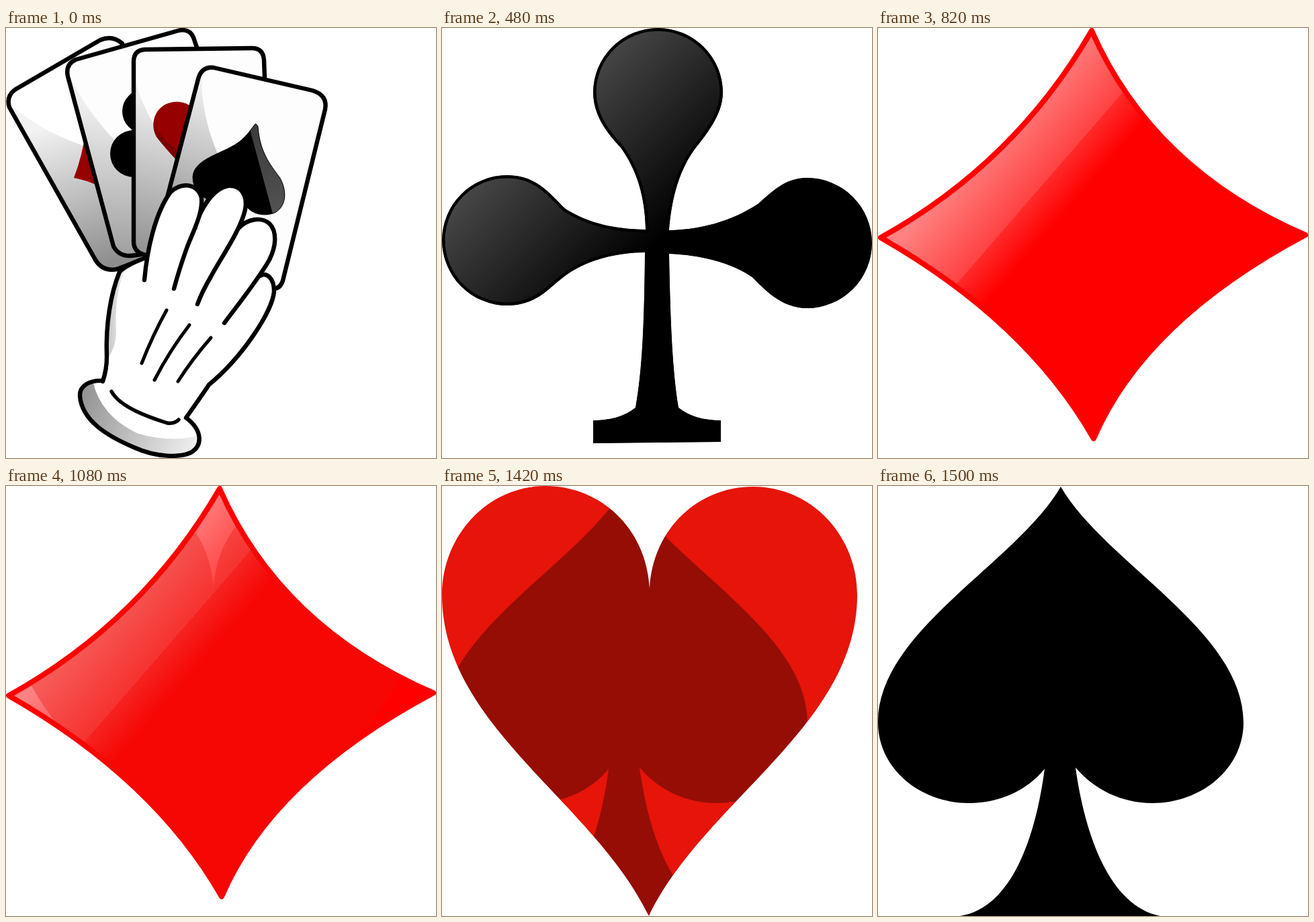
Write an HTML page with a canvas that moves like this. It is 640 by 640 pixels and loops after 1900 ms.

```html
<!DOCTYPE html>
<html>
<head>
<meta charset="utf-8">
<style>
html, body { margin: 0; width: 100%; height: 100%; overflow: hidden; background: #fff; }
canvas { display: block; }
</style>
</head>
<body>
<canvas id="stage" width="640" height="640"></canvas>
<script>
const RED = '#970000', INK = 6.4;
const view = document.getElementById('stage').getContext('2d');

function picture(draw) {
  const canvas = document.createElement('canvas');
  canvas.width = canvas.height = 640;
  const c = canvas.getContext('2d');
  c.lineJoin = c.lineCap = 'round';
  draw(c);
  return canvas;
}

function gradient(c, x0, y0, x1, y1, ...stops) {
  const g = c.createLinearGradient(x0, y0, x1, y1);
  stops.forEach(([at, color]) => g.addColorStop(at, color));
  return g;
}

function shape(c, d, fill, line = 0, color = '#000') {
  const path = new Path2D(d);
  if (fill) { c.fillStyle = fill; c.fill(path); }
  if (line) { c.lineWidth = line; c.strokeStyle = color; c.stroke(path); }
}

// Fill an outline, paint its contents inside it, then stroke it
function framed(c, d, fill, line, paint, color) {
  c.save();
  c.clip(new Path2D(d));
  shape(c, d, fill);
  paint();
  c.restore();
  shape(c, d, null, line, color);
}

function disc(c, x, y, r) {
  c.fillStyle = '#000';
  c.beginPath();
  c.arc(x, y, r, 0, 7);
  c.fill();
}

function drawCards(c) {
  framed(c, 'M173 23Q158 10 140 18L13 92Q0 102 5 118L133 345Q144 363 165 359L212 341Z', '#fff', INK, () => {
    shape(c, 'M4 112Q58 160 135 181L220 215V380H100Z', gradient(c, 85, 140, 150, 350, [0, '#f2f2f2'], [1, '#8e8e8e']));
    shape(c, 'M119 150Q114 190 101 223Q118 226 138 235Z', RED);
  });
  framed(c, 'M104 47L256 4Q273 0 279 14L285 32L215 335L186 339Q168 340 160 325L92 72Q88 54 104 47Z', '#fdfdfd', INK, () => {
    shape(c, 'M91 62Q125 145 230 230V360H140Z', gradient(c, 175, 120, 150, 335, [0, '#efefef'], [1, '#a0a0a0']));
    disc(c, 206, 124, 33);
    disc(c, 190, 187, 35);
  });
  framed(c, 'M190 50Q190 33 207 32L366 30Q383 30 384 48L386 100L240 340L208 338Q190 334 190 318Z', '#fdfdfd', INK, () => {
    shape(c, 'M190 70Q212 160 290 220L240 350H180Z', gradient(c, 245, 115, 190, 330, [0, '#ededed'], [1, '#929292']));
    shape(c, 'M280 120Q264 106 245 111C222 116 213 143 224 162Q238 180 257 200L280 190Z', RED);
    shape(c, 'M220 143Q235 172 270 190L257 200Q238 180 224 162Z', '#7c0000');
  });
  framed(c, 'M309 59L456 93Q479 100 475 121L412 376Q408 389 396 388L260 360L217 340L286 76Q291 57 309 59Z', '#fdfdfd', INK, () => {
    shape(c, 'M291 64Q289 150 335 225L300 300H210Z', gradient(c, 295, 90, 250, 245, [0, '#eee'], [1, '#a8a8a8']));
    framed(c, 'M371 143C366 148 360 160 345 171C320 188 279 195 278 222C278 240 290 250 300 255L355 262C365 278 385 281 400 275C420 264 417 238 407 222C393 203 378 185 375 147Q373 142 371 143Z', '#000', 1, () =>
      shape(c, 'M360 140L398 280H430V140Z', gradient(c, 370, 150, 405, 275, [0, '#3c3c3c'], [1, '#525252'])));
  });
}

function drawGlove(c) {
  const cuff = 'M144 525C125 524 109 532 110 548C113 584 150 607 190 624C225 640 260 639 275 632C292 622 294 600 268 580';
  framed(c, cuff, '#fff', INK, () =>
    shape(c, 'M128 520Q138 576 195 603Q245 619 295 605V645H90V520Z',
      gradient(c, 115, 550, 285, 620, [0, '#959595'], [1, '#f0f0f0'])));
  shape(c, 'M208 342Q180 352 169 363C156 395 148 440 150 490Q150 508 144 526L156 541C170 565 215 580 240 588L268 580Q288 552 302 531C355 488 398 420 400 392L378 370L325 330Z', '#fff');
  shape(c, 'M169 364Q152 412 152 490Q163 476 164 455Q161 400 175 364Z',
    gradient(c, 150, 0, 176, 0, [0, '#c4c4c4'], [1, '#eee']));
  shape(c, 'M208 342Q180 352 169 363C156 395 148 440 150 490Q150 508 144 526', null, INK);
  const fingers = [
    'M378 369C388 363 399 372 399 392C397 420 354 488 302 531Q288 552 268 580',
    'M345 299C360 283 380 281 392 291C404 303 402 325 392 345C375 375 345 412 325 439',
    'M285 285C295 262 310 239 330 235C350 233 360 250 356 270C350 300 318 345 305 370Q292 392 285 411',
    'M206 375C210 330 222 275 245 244C262 229 285 231 291 253C293 275 280 300 270 325Q258 358 250 388'
  ];
  fingers.forEach(d => shape(c, d, '#fff', INK));
  shape(c, 'M239 420Q218 458 202 499M273 442Q243 481 221 524M305 461Q277 493 256 526', null, 5);
  shape(c, 'M157 541C170 565 215 580 240 588Q252 589 257 583', null, 5.5);
}

const hand = picture(c => { drawCards(c); drawGlove(c); });

const club = picture(c => {
  const d = 'M303 300C302 250 290 212 266 178C246 157 225 130 225 96A96.5 96 0 0 1 418 96C418 130 392 160 375 182C350 217 341 262 338 301' +
    'C385 300 430 288 470 262C490 245 510 223 543 223A97 97 0 0 1 543 417C505 417 480 389 462 371C430 349 385 338 338 336' +
    'C340 440 343 510 352 565C368 578 390 584 415 584V616L225 618V584C250 584 272 578 288 565C298 510 301 440 302 334' +
    'C262 334 212 345 178 373C158 388 140 413 97 413A97 97 0 0 1 97 219C145 219 165 253 185 270C220 291 255 299 303 300Z';
  c.clip(new Path2D(d));
  shape(c, d, gradient(c, 115, 115, 320, 320, [0, '#505050'], [1, '#000']), 9);
});

const rhombus = 'M318 4Q204 201 4 312Q221 436 321 611Q396 436 636 308Q408 209 318 4Z';
const diamond = picture(c => shape(c, rhombus,
  gradient(c, 174, 150, 295, 255, [0, '#ff8282'], [.675, '#ff4242'], [.675, '#ff2a2a'], [1, '#f00']), 8, '#f00'));
const paleDiamond = picture(c => shape(c, rhombus, '#fff', 8, '#fff'));

const heart = picture(c => shape(c, 'M309 152C304 62 235 0 154 0C68 0 0 74 0 162C0 357 225 468 308 640C391 468 618 357 618 162C618 74 550 1 463 1C383 1 314 62 309 152Z', '#e61409'));

const spade = picture(c => shape(c, 'M272 1C338 115 544 215 544 352C544 420 482 472 408 472C363 472 322 452 294 419C308 520 345 625 420 640H122C200 628 235 520 248 421C222 453 181 472 136 472C62 472 0 420 0 352C0 215 206 115 272 1Z', '#000'));

const scenes = [hand, club, diamond, heart, spade];
const blends = [club, paleDiamond, heart, spade];

function put(image, alpha = 1, mode = 'source-over') {
  view.globalAlpha = alpha;
  view.globalCompositeOperation = mode;
  view.drawImage(image, 0, 0);
}

function frame() {
  const t = performance.now() % 1900 - 400;
  const i = Math.min(3, Math.floor(t / 340));
  const u = t - i * 340;
  view.clearRect(0, 0, 640, 640);
  if (t < 0) put(hand);
  else if (u >= 80) put(scenes[i + 1]);
  else if (u < 40) {
    put(scenes[i]);
    put(blends[i], .35, 'source-atop');
  } else {
    put(blends[i]);
    put(scenes[i]);
    put(blends[i], .7);
  }
  requestAnimationFrame(frame);
}
frame();
</script>
</body>
</html>
```
